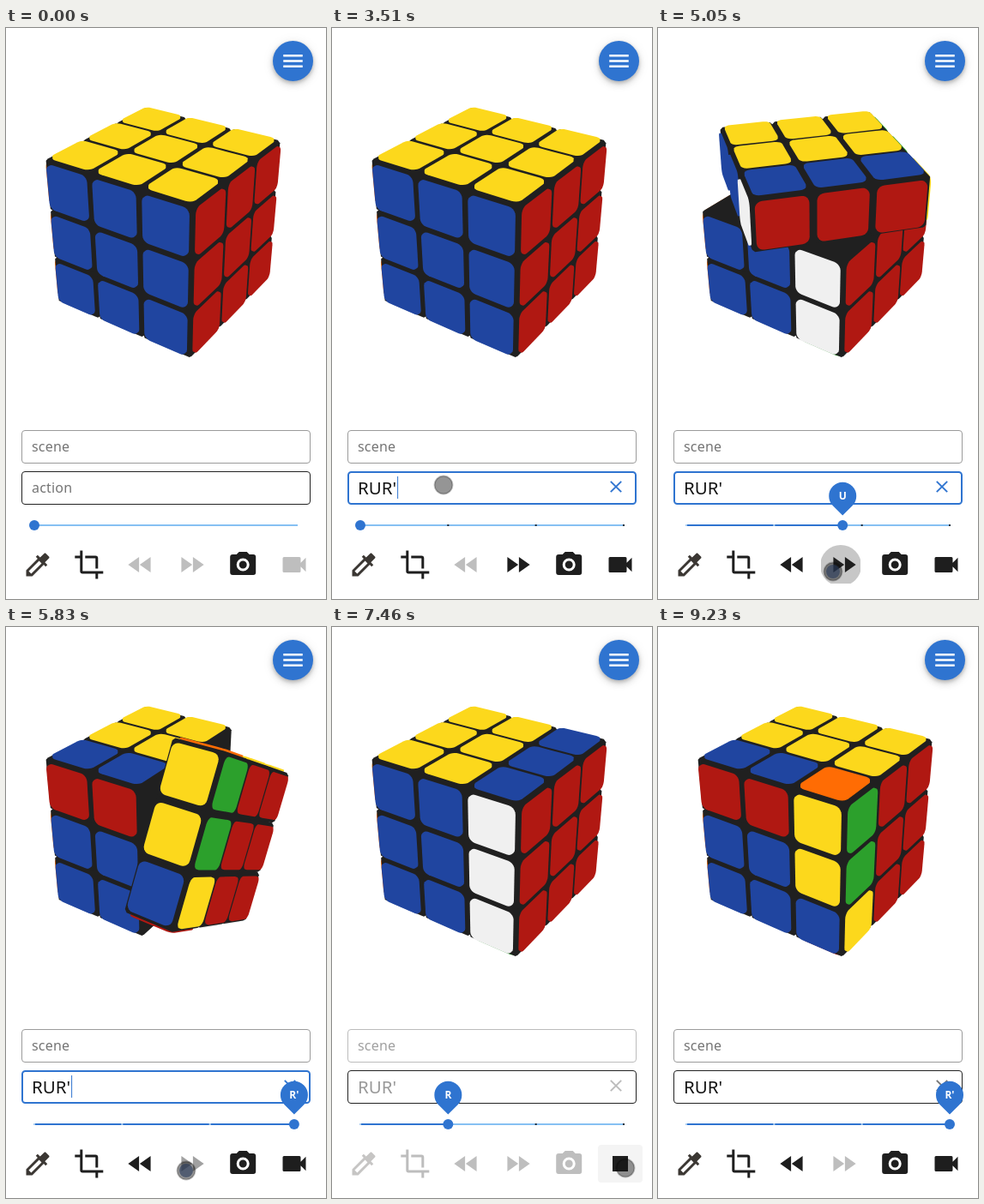
Recreate the animation shown at these times as an HTML page. Size 373 by 666 pixels, loop 9.78 s.

```html
<!DOCTYPE html>
<html lang="en">
<head>
<meta charset="utf-8">
<title>Cube player</title>
<style>
  html, body { margin: 0; width: 100%; height: 100%; overflow: hidden; background: #fff; }
  svg { display: block; width: 100vw; height: 100vh; font-family: "Noto Sans", "Open Sans", sans-serif; }
  .label { font-size: 16px; letter-spacing: .2px; }
  .box { fill: #fff; }
  #fab {
    filter: drop-shadow(0 2px 2px rgba(0, 0, 0, .2)) drop-shadow(0 4px 4px rgba(0, 0, 0, .12))
      drop-shadow(0 1px 6px rgba(0, 0, 0, .08));
  }
</style>
</head>
<body>
<svg viewBox="0 0 373 666">
  <defs>
    <clipPath id="button"><rect x="190" y="603" width="46" height="45" rx="4"/></clipPath>
  </defs>
  <g id="cube"></g>

  <circle id="fab" cx="334.5" cy="38.5" r="23.5" fill="#2f74d0"/>
  <path d="M323.25 32.25h22.5M323.25 38.5h22.5M323.25 44.75h22.5" stroke="#fff" stroke-width="2.5"/>

  <rect id="sceneBox" class="box" x="18.5" y="469.5" width="336" height="38" rx="3.5"/>
  <text id="scene" class="label" x="30" y="494">scene</text>
  <rect id="actionBox" class="box" rx="3.5"/>
  <text id="action" class="label" x="30" y="542">action</text>
  <text id="typed" x="30" y="544" font-size="20.5"></text>
  <rect id="caret" y="523" width="1" height="26" fill="#2f74d0"/>
  <path id="clear" d="M324.8 528.8l12.4 12.4M337.2 528.8l-12.4 12.4" stroke-width="1.9"/>

  <rect x="33" y="579" width="307" height="2" fill="#86c0f3"/>
  <rect id="fill" x="33" y="579" height="2" fill="#2f74d0"/>
  <g id="ticks"></g>
  <circle id="thumb" cy="580" r="6" fill="#2f74d0"/>
  <g id="pin">
    <path d="M0 -6L-11.3 -17.3A16 16 0 1 1 11.3 -17.3Z" fill="#2f74d0"/>
    <text id="move" y="-24.2" font-size="12" font-weight="600" fill="#fff" text-anchor="middle"></text>
  </g>

  <rect id="hover" x="310" y="604" width="52" height="44" rx="4" fill="#f4f4f4"/>
  <circle id="ripple" cx="213" cy="627" clip-path="url(#button)"/>
  <g id="icons"></g>
  <g id="pointer">
    <circle id="ring" r="10.5" fill="rgba(20,20,20,.45)" stroke="rgba(0,0,0,.24)" stroke-width="1.8"/>
    <circle id="press" r="8" fill="rgba(40,58,90,.62)"/>
  </g>
</svg>
<script>
const LOOP = 9780;
const FOCUS = 880, RECORD = 6750, DONE = 8550;
const KEYS = [2020, 2500, 3030, 3510];
const MANUAL = [4360, 4935, 5627], AUTO = [6958, 7487, 8016];
// The cube starts turning slightly before the slider follows
const TURN = 512, LEAD = 17;
const BLUE = '#2f74d0';

const $ = id => document.getElementById(id);
const set = (el, attrs) => { for (const k in attrs) el.setAttribute(k, attrs[k]); };
const show = (el, on) => set(el, { visibility: on ? 'visible' : 'hidden' });
const clamp = v => Math.min(1, Math.max(0, v));
const mix = (a, b, k) => a + (b - a) * k;
const easeOut = k => k * (2 - k);

// cubic-bezier(.25, .8, .5, 1)
function swing(x) {
  if (x <= 0 || x >= 1) return clamp(x);
  const curve = (s, a, b) => 3 * (1 - s) ** 2 * s * a + 3 * (1 - s) * s * s * b + s ** 3;
  let lo = 0, hi = 1;
  for (let i = 0; i < 20; i++) {
    const mid = (lo + hi) / 2;
    if (curve(mid, .25, .5) < x) lo = mid; else hi = mid;
  }
  return curve(lo, .8, 1);
}

// Switches on at the first time, off at the second, and so on
function fade(t, ...flips) {
  let v = 0;
  flips.forEach((at, i) => {
    const k = clamp((t - at) / 250);
    if (t >= at) v = i % 2 ? 1 - k : k;
  });
  return v;
}

/* ---- cube ---- */
const YAW = 33.75 * Math.PI / 180, PITCH = Math.PI / 6;
const FOCAL = 834, DIST = 13.3, CX = 186.5, CY = 227.7;
const CAM = [Math.sin(YAW) * Math.cos(PITCH), Math.sin(PITCH), Math.cos(YAW) * Math.cos(PITCH)].map(v => v * DIST);
const COLORS = [['#ff6c04', '#b01812'], ['#f0f0f0', '#fcd81c'], ['#2ca02c', '#2045a0']];
const MOVES = [
  { name: 'R', axis: 0, dir: -1 },
  { name: 'U', axis: 1, dir: -1 },
  { name: "R'", axis: 0, dir: 1 }
];

function rotate(v, axis, angle) {
  const i = (axis + 1) % 3, j = (axis + 2) % 3;
  const c = Math.cos(angle), s = Math.sin(angle), r = [...v];
  r[i] = v[i] * c - v[j] * s;
  r[j] = v[i] * s + v[j] * c;
  return r;
}

function project([x, y, z]) {
  const vx = x * Math.cos(YAW) - z * Math.sin(YAW);
  const d = x * Math.sin(YAW) + z * Math.cos(YAW);
  const vy = y * Math.cos(PITCH) - d * Math.sin(PITCH);
  const k = FOCAL / (DIST - y * Math.sin(PITCH) - d * Math.cos(PITCH));
  return [CX + vx * k, CY - vy * k];
}

function solved() {
  const cubies = [], range = [-1, 0, 1];
  for (const x of range) for (const y of range) for (const z of range) {
    const pos = [x, y, z], stickers = [];
    pos.forEach((v, axis) => {
      if (!v) return;
      const n = [0, 0, 0];
      n[axis] = v;
      stickers.push({ n, color: COLORS[axis][v > 0 ? 1 : 0] });
    });
    cubies.push({ pos, stickers });
  }
  return cubies;
}

function turn(cubies, { axis, dir }) {
  const quarter = v => rotate(v, axis, dir * Math.PI / 2).map(Math.round);
  return cubies.map(c => c.pos[axis] < 1 ? c : {
    pos: quarter(c.pos),
    stickers: c.stickers.map(s => ({ n: quarter(s.n), color: s.color }))
  });
}

const STATES = [solved()];
MOVES.forEach((m, i) => STATES.push(turn(STATES[i], m)));

// Corners of a box with bevelled edges
const BODY = [];
for (let axis = 0; axis < 3; axis++)
  for (let bits = 0; bits < 8; bits++)
    BODY.push([0, 1, 2].map(k => (bits >> k & 1 ? 1 : -1) * (k === axis ? .5 : .453)));

// Rounded square of a sticker
const SIDE = .432, ROUND = .12, LIFT = .035, SQUARE = [];
for (let i = 0; i < 24; i++) {
  const q = Math.floor(i / 6), a = (q + i % 6 / 5) * Math.PI / 2;
  const mid = (q + .5) * Math.PI / 2, inner = SIDE - ROUND;
  SQUARE.push([
    Math.sign(Math.cos(mid)) * inner + ROUND * Math.cos(a),
    Math.sign(Math.sin(mid)) * inner + ROUND * Math.sin(a)
  ]);
}

function hull(points) {
  points.sort((a, b) => a[0] - b[0] || a[1] - b[1]);
  const half = list => {
    const out = [];
    for (const p of list) {
      while (out.length > 1) {
        const [a, b] = out.slice(-2);
        if ((b[0] - a[0]) * (p[1] - a[1]) - (b[1] - a[1]) * (p[0] - a[0]) > 0) break;
        out.pop();
      }
      out.push(p);
    }
    return out.slice(0, -1);
  };
  return [...half(points), ...half([...points].reverse())];
}

const add = (a, b, k = 1) => a.map((v, i) => v + b[i] * k);
const dot = (a, b) => a[0] * b[0] + a[1] * b[1] + a[2] * b[2];

function solid(points, color) {
  const d = hull(points.map(project)).map(p => p.map(v => v.toFixed(2)).join(' ')).join('L');
  return `<path fill="${color}" d="M${d}Z"/>`;
}

// A thin slab with coloured sides
function slab(pos, n) {
  const axis = n.findIndex(v => v);
  return [.5, .5 + LIFT].flatMap(h => SQUARE.map(([u, v]) => {
    const p = add(pos, n, h);
    p[(axis + 1) % 3] += u;
    p[(axis + 2) % 3] += v;
    return p;
  }));
}

function drawCubies(cubies, spin) {
  const far = c => { const d = add(CAM, spin(c.pos), -1); return dot(d, d); };
  return [...cubies].sort((a, b) => far(b) - far(a)).map(({ pos, stickers }) => {
    let back = '', front = '';
    for (const { n, color } of stickers) {
      const path = solid(slab(pos, n).map(spin), color);
      const toCam = add(CAM, spin(add(pos, n, .5 + LIFT)), -1);
      if (dot(spin(n), toCam) > 0) front += path; else back += path;
    }
    return back + solid(BODY.map(b => spin(add(pos, b))), '#202020') + front;
  }).join('');
}

let lastPose = '';
function drawCube(index, k) {
  const pose = index + ':' + k;
  if (pose === lastPose) return;
  lastPose = pose;
  const { axis, dir } = MOVES[index], cubies = STATES[index];
  const moving = c => c.pos[axis] === 1;
  // The camera is always on the turning layer's side
  $('cube').innerHTML = drawCubies(cubies.filter(c => !moving(c)), v => v) +
    drawCubies(cubies.filter(moving), v => rotate(v, axis, dir * k * Math.PI / 2));
}

/* ---- controls ---- */
const ICONS = {
  dropper: 'M20.71 5.63L18.37 3.29C17.98 2.9 17.35 2.9 16.96 3.29L13.84 6.41L11.91 4.5L10.5 5.91L11.92 7.33L3 16.25V21H7.75L16.67 12.08L18.09 13.5L19.5 12.09L17.58 10.17L20.7 7.05C21.1 6.65 21.1 6.02 20.71 5.63ZM6.92 19L5 17.08L13.06 9.02L14.98 10.94Z',
  crop: 'M7 17V1H5V5H1V7H5V17A2 2 0 0 0 7 19H17V23H19V19H23V17ZM17 15H19V7A2 2 0 0 0 17 5H9V7H17Z',
  rewind: 'M11.5 12L20 18V6ZM11 18V6L2.5 12Z',
  forward: 'M13 6V18L21.5 12ZM4 18L12.5 12L4 6Z',
  camera: 'M4 4H7L9 2H15L17 4H20A2 2 0 0 1 22 6V18A2 2 0 0 1 20 20H4A2 2 0 0 1 2 18V6A2 2 0 0 1 4 4ZM12 7A5 5 0 0 0 12 17A5 5 0 0 0 12 7ZM12 9A3 3 0 0 1 12 15A3 3 0 0 1 12 9Z',
  video: 'M17 10.5V7A1 1 0 0 0 16 6H4A1 1 0 0 0 3 7V17A1 1 0 0 0 4 18H16A1 1 0 0 0 17 17V13.5L21 17.5V6.5Z'
};
const STOP = 'M6 6H18V18H6Z';
$('icons').innerHTML = Object.entries(ICONS).map(([id, d], i) =>
  `<path id="${id}" d="${d}" fill="${i ? '#1e1e1e' : '#3b3733'}" fill-rule="evenodd"
    transform="translate(${37 + 59.8 * i} 626) scale(1.5) translate(-12 -12)"/>`).join('');
$('ticks').innerHTML = '<rect y="579" width="2" height="2"/>'.repeat(4);

function drawIcons(t) {
  const tools = fade(t, -999, RECORD, DONE);
  const level = {
    dropper: tools, crop: tools, camera: tools,
    rewind: fade(t, MANUAL[0], RECORD, DONE),
    forward: fade(t, KEYS[0], MANUAL[2]),
    video: fade(t, KEYS[0])
  };
  for (const id in level) set($(id), { opacity: mix(.29, 1, level[id]) });
  set($('video'), { d: t >= RECORD && t < DONE ? STOP : ICONS.video });
  set($('hover'), { opacity: fade(t, RECORD, 7600) });

  const since = t - MANUAL.filter(s => s <= t).pop();
  const on = t < MANUAL[2] && since < 450;
  show($('ripple'), on);
  if (on) set($('ripple'), { r: 24 * easeOut(clamp(since / 110)), opacity: .22 * clamp((450 - since) / 250) });
}

function drawFields(t) {
  const focused = t >= FOCUS && t < RECORD, busy = t >= RECORD && t < DONE;
  const count = KEYS.filter(k => k <= t).length;
  set($('sceneBox'), { stroke: busy ? '#bcbcbc' : '#9b9b9b' });
  set($('scene'), { fill: busy ? '#a0a0a0' : '#757575' });
  const line = focused ? 2 : 1;
  set($('actionBox'), {
    x: 18 + line / 2, y: 517 + line / 2, width: 337 - line, height: 39 - line,
    stroke: focused ? BLUE : '#222', 'stroke-width': line
  });
  set($('action'), { fill: focused ? BLUE : '#757575' });
  show($('action'), !count);
  $('typed').textContent = "RUR'".slice(0, count);
  set($('typed'), { fill: busy ? '#9a9a9a' : '#151515' });
  const last = count ? KEYS[count - 1] : FOCUS;
  show($('caret'), focused && Math.floor((t - last) / 500) % 2 === 0);
  set($('caret'), { x: 30 + (count ? $('typed').getComputedTextLength() + 1 : 0) });
  show($('clear'), count);
  set($('clear'), { stroke: focused ? BLUE : busy ? '#bbb' : '#757575' });
}

function drawSlider(t, starts, n) {
  let value = starts.reduce((v, s) => v + swing((t - s) / 300), 0);
  if (starts === AUTO) value += 3 * (1 - swing((t - RECORD) / 300));
  const x = 33 + 307 * clamp(value / 3);
  set($('fill'), { width: x - 33 });
  set($('thumb'), { cx: x });

  const total = KEYS.slice(0, 3).filter(k => k <= t).length;
  const k = total ? swing((t - KEYS[total - 1]) / 300) : 0;
  [...$('ticks').children].forEach((tick, i) => {
    show(tick, total && i <= total);
    if (!total) return;
    const tx = 33 + 307 * mix(Math.min(1, i / (total - 1 || 1)), Math.min(1, i / total), k);
    set(tick, { x: tx - 1, fill: tx <= x ? '#a9cdf1' : '#1c2a3a' });
  });

  const size = fade(t, MANUAL[0], RECORD, AUTO[0]);
  show($('pin'), size > 0);
  set($('pin'), { transform: `translate(${x} 574.5) scale(${size})` });
  $('move').textContent = MOVES[(n + 2) % 3].name;
}

// time, x, y
const PATH = [
  [70, 244, 597], [240, 146, 496], [380, 146, 497], [640, 130, 533],
  [4000, 130, 533], [4280, 213, 632], [4700, 209, 634], [4933, 204, 634],
  [5100, 204, 634], [5627, 210, 634], [6300, 210, 634], [6600, 362, 641],
  [6700, 360, 640], [6900, 342, 631], [8720, 342, 631], [8980, 345, 682]
];

function drawPointer(t) {
  const i = PATH.findIndex(p => p[0] > t);
  show($('ring'), i > 0);
  const pressed = [FOCUS - 120, ...MANUAL, RECORD].some(s => t >= s && t < s + 260);
  show($('press'), i > 0 && pressed);
  if (i < 1) return;
  const [a, b] = [PATH[i - 1], PATH[i]], k = (t - a[0]) / (b[0] - a[0]);
  set($('pointer'), { transform: `translate(${mix(a[1], b[1], k)} ${mix(a[2], b[2], k)})` });
}

function draw(t) {
  const starts = t < RECORD ? MANUAL : AUTO;
  const begun = time => starts.filter(s => s <= time).length;
  const n = begun(t + LEAD);
  const k = n ? easeOut(clamp((t + LEAD - starts[n - 1]) / TURN)) : 0;
  drawCube(Math.max(0, n - 1), k);
  drawFields(t);
  drawSlider(t, starts, begun(t));
  drawIcons(t);
  drawPointer(t);
}

const begin = performance.now();
function tick() {
  draw((performance.now() - begin) % LOOP);
  requestAnimationFrame(tick);
}
tick();
</script>
</body>
</html>
```
